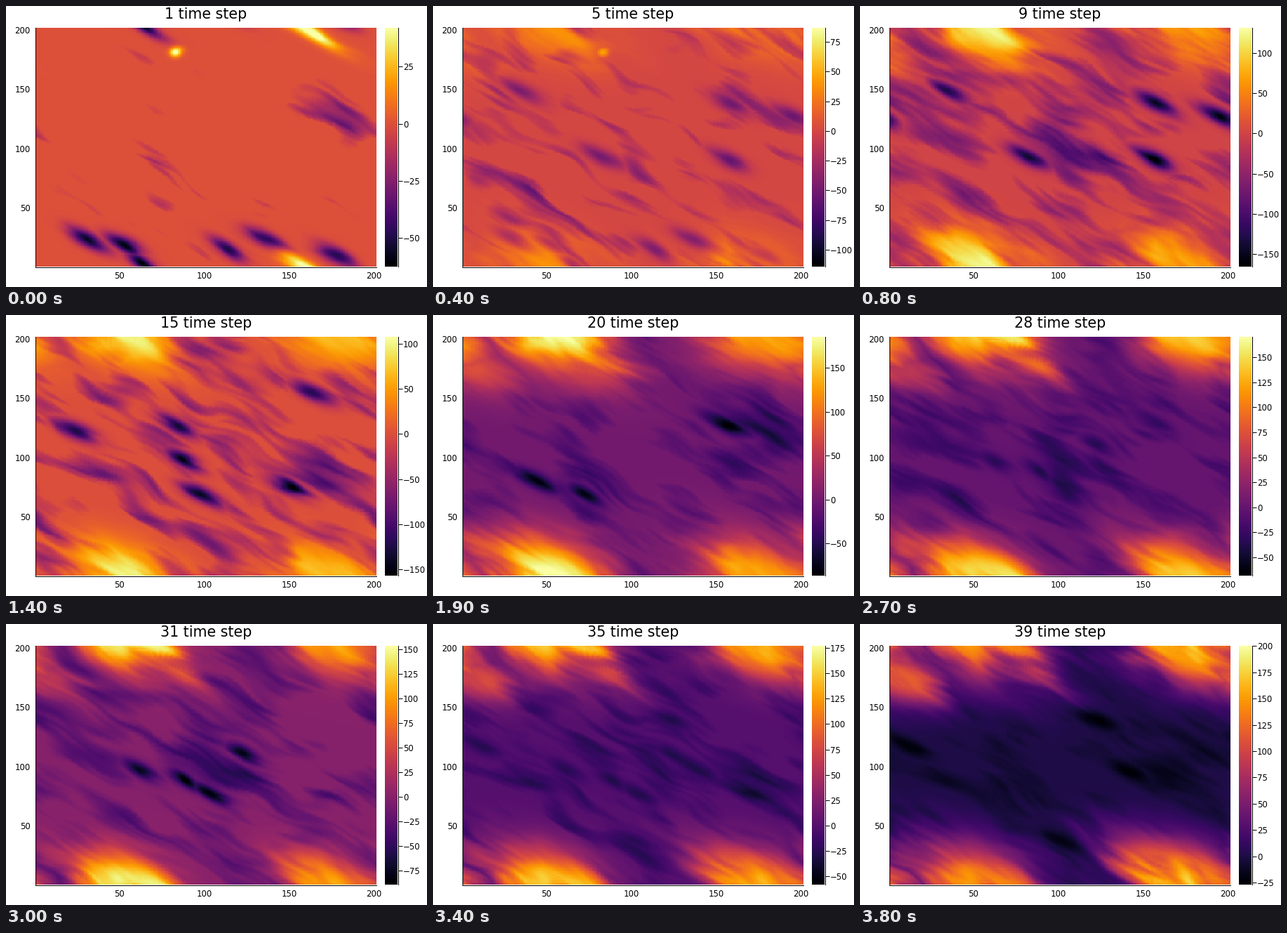
A matplotlib script that plays this animation: 600 by 400 pixels, repeating every 3.9 s.

```python
import numpy as np
import matplotlib.pyplot as plt
from matplotlib.animation import FuncAnimation

W, H, N = 600, 400, 201
STEPS = 39
TILT = np.radians(40)
C, S = np.cos(TILT), np.sin(TILT)

plt.rcParams["font.family"] = "DejaVu Sans"
rng = np.random.default_rng(7)
X, Y = np.meshgrid(np.arange(1, N + 1), np.arange(1, N + 1))

# Key steps: colour range, heat of each zone relative to its top, zone size.
KEYS = [1, 9, 15, 20, 24, 31, 39]
LOW = [-62.6, -165.7, -157, -86.8, -40.4, -89, -27]
HIGH = [42, 131.5, 107.8, 185.6, 192.8, 153.6, 200.3]
WEST = [0, 1, 1, 1, 0.85, 1, 0.72]
EAST = [0, 0.72, 0.68, 0.75, 0.97, 0.75, 0.96]
EDGE = [0, 0.35, 0.1, 0.42, 0.52, 0.3, 0.65]
SPREAD = [0.8, 0.88, 0.8, 1, 1.15, 0.8, 1.08]

# Centres of the coldest lenses at each key step, deepest first.
COLD = [
    [(66, 2), (56, 17), (32, 23), (136, 23), (116, 14), (178, 10)],
    [(158, 90), (195, 127), (158, 138), (82, 93), (36, 148)],
    [(150, 76), (88, 98), (100, 68), (83, 127), (25, 122), (165, 154)],
    [(157, 127), (45, 80), (75, 68)],
    [(156, 130), (104, 67)],
    [(90, 88), (106, 76), (125, 110), (62, 97)],
    [(122, 140), (143, 95), (10, 118), (100, 38)],
]


def at(step, values):
    return np.interp(step, KEYS, values)


def streaks(length, width):
    """Periodic noise drawn out along the flow direction, with unit deviation."""
    k = 2 * np.pi * np.fft.fftfreq(N)
    kx, ky = np.meshgrid(k, k)
    along, across = kx * C - ky * S, kx * S + ky * C
    keep = np.exp(-((along * length) ** 2 + (across * width) ** 2) / 2)
    f = np.fft.ifft2(np.fft.fft2(rng.normal(size=(N, N))) * keep).real
    return f / f.std()


def texture():
    """Streaks of two widths, swayed so that they do not run straight."""
    f = 0.9 * streaks(11, 4.5) + 0.4 * streaks(10, 1.4)
    sway = np.rint(3 * streaks(10, 7)).astype(int)
    return f[(Y + sway) % N, X % N]


GRAIN = texture(), texture()
BEND = texture(), texture()


def turn(pair, step, rate):
    return np.cos(rate * step) * pair[0] + np.sin(rate * step) * pair[1]


def wrap(d):
    return (d + N / 2) % N - N / 2


def bell(x, y, length, width, bend):
    """Bell tilted along the flow, with its rim frayed by the bend."""
    dx, dy = wrap(X - x), wrap(Y - y)
    u = (dx * C - dy * S) / length + 0.15 * bend
    v = (dx * S + dy * C) / width + 0.1 * bend
    return np.exp(-u * u - v * v)


def warmth(step, bend):
    size = at(step, SPREAD)
    zones = [(WEST, 52, 3, 42, 27), (EAST, 175, 1, 42, 26), (EDGE, 9, 174, 26, 17)]
    heat = [at(step, share) * bell(x, y, size * a, size * b, bend)
            for share, x, y, a, b in zones]
    spark = np.interp(step, [1, 9], [1.15, 0])
    heat += [spark * bell(160, -1, 25, 5, bend), spark * bell(84, 181, 4, 4, bend)]
    return np.max(heat, axis=0)


def lenses(step, bend):
    depth = np.zeros((N, N))
    for i, spots in enumerate(COLD):
        share = at(step, np.eye(len(KEYS))[i])
        if share > 0:
            hit = [0.95 ** j * bell(x, y, 14, 5.5, bend)
                   for j, (x, y) in enumerate(spots)]
            depth += share * np.max(hit, axis=0)
    return depth


def field(step):
    lo, hi = at(step, LOW), at(step, HIGH)
    bend, grain = turn(BEND, step, 0.1), turn(GRAIN, step, 0.3)
    warm = warmth(step, bend)
    # The calm plain lies at zero; streaks only dig into it.
    cut = np.interp(step, [1, 9], [1.2, -0.5])
    dips = 0.17 * np.maximum(grain - cut, 0)
    cold = np.maximum(dips, lenses(step, bend))
    return hi * warm * (1 + 0.05 * grain) + lo * cold * (1 - 0.6 * np.clip(warm, 0, 1))


def px(n):
    return n * 0.72


def box(left, top, right, bottom, sides):
    a = fig.add_axes([left / W, 1 - bottom / H,
                      (right - left) / W, (bottom - top) / H])
    for side, spine in a.spines.items():
        spine.set_visible(side in sides)
        spine.set_linewidth(px(1))
        if side in sides:
            spine.set_position(("outward", px(0.5)))
    return a


fig = plt.figure(figsize=(W / 100, H / 100), dpi=100, facecolor="white")
style = dict(cmap="inferno", origin="lower", aspect="auto", interpolation="nearest")

ax = box(42, 31, 528, 371, ("left", "bottom"))
heat = ax.imshow(np.zeros((N, N)), extent=(0.5, N + 0.5, 0.5, N + 0.5), **style)
ax.set_xticks([50, 100, 150, 200])
ax.set_yticks([50, 100, 150, 200])
ax.tick_params(length=0, labelsize=8.5)
ax.tick_params(axis="x", pad=px(6))
ax.tick_params(axis="y", pad=px(7))

bar = box(540, 31, 558, 371, ("right",))
ramp = bar.imshow(np.linspace(0, 1, 256)[:, None], **style)
bar.set_xticks([])
bar.yaxis.tick_right()
bar.tick_params(length=px(6), width=px(1), pad=px(1.5), labelsize=8.5)

title = fig.text(285 / W, 1 - 18 / H, "", fontsize=14.9, ha="center",
                 va="baseline")


def draw(i):
    step = i + 1
    lo, hi = at(step, LOW), at(step, HIGH)
    heat.set_data(field(step))
    heat.set_clim(lo, hi)
    ramp.set_extent((0, 1, lo, hi))
    gap = 25 if hi - lo < 250 else 50
    ticks = np.arange(np.ceil(lo / gap), np.floor(hi / gap) + 1) * gap + 0.0
    bar.set_yticks(ticks, [f"{t:.0f}".replace("-", "\u2212") for t in ticks])
    bar.set_ylim(lo, hi)
    title.set_text(f"{step} time step")
    return heat, ramp, title


anim = FuncAnimation(fig, draw, frames=STEPS, interval=100, repeat=True)
plt.show()
```
